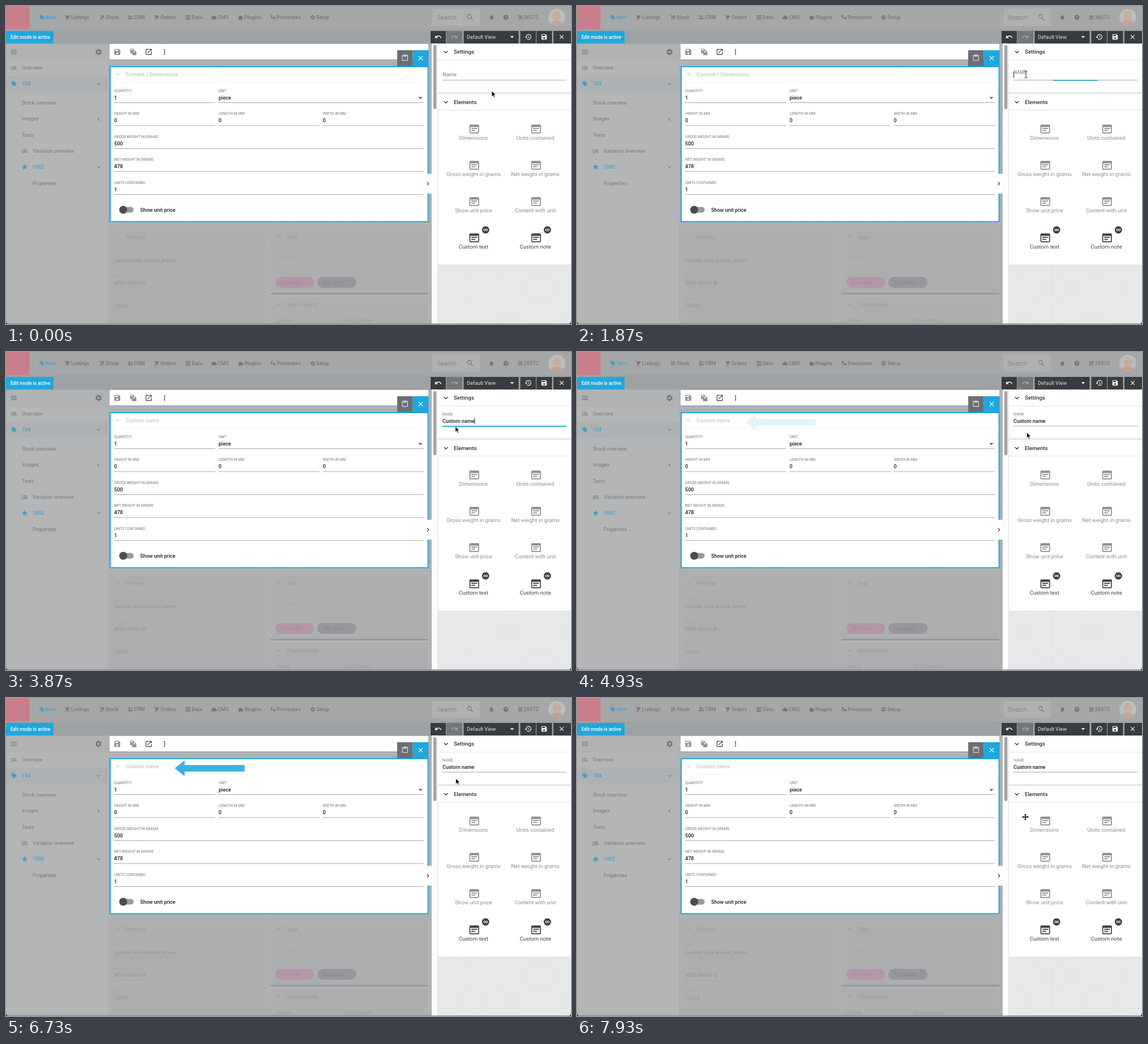
Recreate the animation shown at these times as an HTML page. Size 998x561 px, loop 8000 ms.

```html
<!DOCTYPE html>
<html lang="en">
<head>
<meta charset="utf-8">
<title>Edit mode</title>
<style>
html, body { margin: 0; width: 100%; height: 100%; overflow: hidden; background: #b4b6b8; }
svg { display: block; width: 998px; height: 561px; font-family: Roboto, "Liberation Sans", sans-serif; }
text { white-space: pre; }
</style>
</head>
<body>
<svg id="stage" viewBox="0 0 998 561"></svg>
<script>
const BLUE = '#20a7dc', DARK = '#383b40', DIM = '#75787b', DIMBLUE = '#439fc8', INK = '#1c1c1c';

// Icon paths on a 24 unit grid
const ICON = {
  save: 'M17 3H5a2 2 0 0 0-2 2v14a2 2 0 0 0 2 2h14a2 2 0 0 0 2-2V7zm-5 16a3 3 0 1 1 0-6 3 3 0 0 1 0 6zm3-10H5V5h10z',
  history: 'M13 3a9 9 0 0 0-9 9H1l4 4 4-4H6a7 7 0 1 1 2.06 4.94l-1.42 1.42A9 9 0 1 0 13 3zm-1 5v5l4.28 2.54.72-1.21-3.5-2.08V8z',
  undo: 'M12.5 8c-2.65 0-5.05 1-6.9 2.6L2 7v9h9l-3.62-3.62A8 8 0 0 1 20.1 16l2.37-.78A10.5 10.5 0 0 0 12.5 8z',
  close: 'M19 6.4 17.6 5 12 10.6 6.4 5 5 6.4l5.6 5.6L5 17.6 6.4 19l5.6-5.6 5.6 5.6 1.4-1.4-5.6-5.6z',
  down: 'M7.4 8.6 12 13.2l4.6-4.6L18 10l-6 6-6-6z',
  left: 'M15.4 7.4 10.8 12l4.6 4.6L14 18l-6-6 6-6z',
  right: 'M8.6 16.6 13.2 12 8.6 7.4 10 6l6 6-6 6z',
  drop: 'M7 10l5 5 5-5z',
  open: 'M19 19H5V5h7V3H5a2 2 0 0 0-2 2v14a2 2 0 0 0 2 2h14a2 2 0 0 0 2-2v-7h-2zM14 3v2h3.6l-9.8 9.8 1.4 1.4L19 6.4V10h2V3z',
  more: 'M12 8a2 2 0 1 0 0-4 2 2 0 0 0 0 4zm0 2a2 2 0 1 0 0 4 2 2 0 0 0 0-4zm0 6a2 2 0 1 0 0 4 2 2 0 0 0 0-4z',
  menu: 'M3 18h18v-2H3zm0-5h18v-2H3zm0-7v2h18V6z',
  search: 'M15.5 14h-.8l-.3-.3A6.5 6.5 0 1 0 13.7 14.4l.3.3v.8l5 5 1.5-1.5zm-6 0a4.5 4.5 0 1 1 0-9 4.5 4.5 0 0 1 0 9z',
  bell: 'M12 22a2 2 0 0 0 2-2h-4a2 2 0 0 0 2 2zm6-6v-5c0-3-1.6-5.6-4.5-6.3V4a1.5 1.5 0 0 0-3 0v.7C7.6 5.4 6 7.9 6 11v5l-2 2v1h16v-1z',
  star: 'M12 17.3 18.2 21l-1.6-7L22 9.2l-7.2-.6L12 2 9.2 8.6 2 9.2 7.4 14l-1.6 7z',
  tag: 'M21.4 11.6l-9-9A2 2 0 0 0 11 2H4a2 2 0 0 0-2 2v7c0 .55.22 1 .59 1.4l9 9a2 2 0 0 0 2.8 0l7-7a2 2 0 0 0 0-2.8zM5.5 7a1.5 1.5 0 1 1 0-3 1.5 1.5 0 0 1 0 3z',
  form: 'M20 3H4a2 2 0 0 0-2 2v14a2 2 0 0 0 2 2h16a2 2 0 0 0 2-2V5a2 2 0 0 0-2-2zm0 16H4V8h16zM6 10h12v2H6zm0 4h8v2H6z',
  clip: 'M19 3h-4.2a3 3 0 0 0-5.6 0H5a2 2 0 0 0-2 2v14a2 2 0 0 0 2 2h14a2 2 0 0 0 2-2V5a2 2 0 0 0-2-2zm-7 0a1 1 0 1 1 0 2 1 1 0 0 1 0-2zm7 16H5V5h2v3h10V5h2z',
  cart: 'M7 18a2 2 0 1 0 0 4 2 2 0 0 0 0-4zM1 2v2h2l3.6 7.6-1.4 2.4c-.7 1.3.3 3 1.8 3h12v-2H7.4l1.1-2h7.5c.7 0 1.4-.4 1.7-1l3.6-6.5A1 1 0 0 0 20.4 4H5.2l-.9-2zm10 16a2 2 0 1 0 0 4 2 2 0 0 0 0-4z',
  find: 'M7 9H2V7h5zm0 3H2v2h5zm13.6 7-3.8-3.8A5 5 0 1 1 18.2 13.8L22 17.6zM17 11a3 3 0 1 0-6 0 3 3 0 0 0 6 0zM2 19h10v-2H2z',
  copy: 'M3 2h9l3 3v3h3l4 4v10H9v-6H3zm2 2v3h6V4zm6 6v3h6v-3z',
  truck: 'M2 2h4l4 14h11v2H10a3 3 0 1 1-3-2L4.500 4H2zm8 3 8-2 3 9-8 2z',
  people: 'M8 11a4 4 0 1 0 0-8 4 4 0 0 0 0 8zm9 0a3 3 0 1 0 0-6 3 3 0 0 0 0 6zM1 20c0-9 14-9 14 0zm15 0h7c0-5-3-7-8-6z',
  bars: 'M2 3h20v4H2zm0 7h20v4H2zm0 7h20v4H2z',
  cloud: 'M6 20a5.500 5.500 0 0 1-.5-11A7 7 0 0 1 19 10a5 5 0 0 1 0 10z',
  puzzle: 'M3 7h5a3 3 0 1 1 6 0h5v5a3 3 0 1 1 0 5v5h-6a3 3 0 0 0-5 0H3v-5a3 3 0 0 0 0-5z',
  flow: 'M2 3h8v6H7v5h7v-3h8v9h-8v-3H4V9H2z',
  gear: 'M10 2h4l.6 3 2 1.100 2.800-1 2 3.500-2.200 2v2.800l2.200 2-2 3.500-2.800-1-2 1.100-.6 3h-4l-.6-3-2-1.100-2.800 1-2-3.500 2.200-2v-2.800l-2.200-2 2-3.500 2.800 1 2-1.100zM12 8.500a3.500 3.500 0 1 0 0 7 3.500 3.500 0 0 0 0-7z'
};

let out = '';
const rect = (x, y, w, h, fill, more = '') =>
  out += `<rect x="${x}" y="${y}" width="${w}" height="${h}" fill="${fill}" ${more}/>`;
const line = (x1, x2, y, stroke, w = 1, more = '') =>
  out += `<path d="M${x1} ${y}H${x2}" stroke="${stroke}" stroke-width="${w}" ${more}/>`;
const circle = (x, y, r, fill, more = '') =>
  out += `<circle cx="${x}" cy="${y}" r="${r}" fill="${fill}" ${more}/>`;
const text = (x, y, str, size, fill, weight = 400, more = '') =>
  out += `<text x="${x}" y="${y}" font-size="${size}" fill="${fill}" font-weight="${weight}" ${more}>${str}</text>`;
const icon = (name, x, y, size, fill, flip = 1) => {
  const s = size / 24;
  out += `<path transform="translate(${x} ${y}) scale(${s * flip} ${s}) translate(-12 -12)" fill="${fill}" fill-rule="evenodd" d="${ICON[name]}"/>`;
};

function header() {
  rect(0, 0, 998, 41, '#a5a7a9');
  rect(0, 41, 998, 25.500, '#9fa2a4');
  rect(0, 0, 41.500, 41, '#c97f89');
  const nav = [['Item', 70, 'tag'], ['Listings', 115, 'cart'], ['Stock', 176, 'truck'], ['CRM', 226, 'people'],
    ['Orders', 273, 'cart'], ['Data', 328, 'bars'], ['CMS', 374, 'cloud'], ['Plugins', 421, 'puzzle'],
    ['Processes', 478, 'flow'], ['Setup', 548, 'gear']];
  nav.forEach(([label, x, name], i) => {
    const fill = i ? DIM : DIMBLUE;
    icon(name, x - 6.500, 20, 10, fill);
    text(x, 23.200, label, 9.100, fill, 500);
  });
  rect(753, 5, 84, 30, '#aeb0b2', 'rx="1"');
  text(761, 24, 'Search', 11.400, '#85888b');
  icon('search', 820, 20, 15, DIM);
  icon('bell', 857.500, 20, 11, DIM);
  circle(883, 20, 4.500, DIM);
  text(883, 22.800, '?', 7.500, '#a5a7a9', 700, 'text-anchor="middle"');
  icon('bars', 908.500, 20, 9, DIM);
  text(914.500, 23.200, '26572', 9.300, DIM, 500);
  circle(973, 20, 15, '#bcbdbd');
  out += '<path d="M963 31c0-7 20-7 20 0a15 15 0 0 1-20 0z" fill="#c3a493"/>';
  out += '<ellipse cx="973" cy="17.500" rx="7" ry="8.500" fill="#c9ad98"/>';
  rect(0, 44, 84, 22, BLUE);
  text(8, 58, 'Edit mode is active', 8.300, '#fff', 500);
}

function sidebar() {
  rect(0, 66, 180, 495, '#b3b5b7');
  rect(0, 66, 180, 29, '#b0b2b4');
  line(0, 180, 95, '#a9abad', .7);
  icon('menu', 14, 81, 14, DIM);
  icon('gear', 163.500, 81, 14, DIM);
  icon('find', 14, 109, 13, DIM);
  text(28, 112, 'Overview', 9, DIM);
  rect(0, 123, 180, 28, '#aeb1b3');
  icon('tag', 14, 137, 11, DIMBLUE);
  text(28, 140, '104', 9, DIMBLUE, 500);
  icon('down', 163.500, 137, 13, DIM);
  text(28, 174, 'Stock overview', 9, DIM);
  text(28, 202.300, 'Images', 9, DIM);
  icon('left', 163.500, 199.500, 13, DIM);
  text(28, 230.500, 'Texts', 9, DIM);
  icon('find', 33, 256, 13, DIM);
  text(47, 259, 'Variation overview', 9, DIM);
  icon('star', 33, 284, 13, DIMBLUE);
  text(47, 287, '1002', 9, DIMBLUE, 500);
  icon('down', 163.500, 284, 13, DIM);
  text(47, 315.500, 'Properties', 9, DIM);
}

function backdrop() {
  const dash = 'stroke-dasharray="1.500 1.500"', edge = '#a0a2a4', faint = '#a3a5a7';
  rect(180, 66, 572, 495, '#b0b2b4');
  rect(183, 67, 563, 27.500, '#fff');
  rect(183, 94.500, 563, 1.500, '#9d9fa1');
  icon('save', 196.500, 81, 14, '#8f9194');
  icon('copy', 224.500, 81, 14, '#8f9194');
  icon('open', 252, 81, 14, DARK);
  icon('more', 280, 81, 14, DARK);
  [103, 386.500, 391].forEach(y => line(181, 748, y, edge, 1, dash));
  out += `<path d="M181 103V561M748.500 103V561M464.500 391V561" stroke="${edge}" stroke-width="1" ${dash}/>`;
  rect(183, 393.500, 279, 168, '#acaeb0');
  rect(467, 393.500, 279, 115, '#acaeb0');
  rect(467, 506.500, 279, 2, '#908f95');
  rect(467, 513, 279, 48, '#acaeb0');
  [[197, 407], [481.500, 407], [481.500, 526.500]].forEach(([x, y]) => icon('down', x, y, 13, '#9b9da0'));
  text(211, 410.500, 'Settings', 9.550, '#9c9ea0', 500);
  text(495, 410.500, 'Tags', 9.550, '#9c9ea0', 500);
  text(495, 530, 'Client (store)', 9.550, '#9c9ea0', 500);
  line(183, 462, 422, '#a5a7a9', .6);
  text(191, 451.500, 'Leather sofa walnut, brown', 9, '#989a9c', 500);
  text(191, 492, 'WSG-00431-B', 9, '#989a9c', 500);
  text(191, 532, '12345', 9, '#989a9c', 500);
  [['NAME', 438], ['NUMBER', 479], ['MODEL', 519]].forEach(([s, y]) => text(191, y, s, 6.500, '#a6a8aa'));
  [457, 498, 538].forEach(y => line(191, 455, y, faint, .6));
  text(477, 446, 'Add tags', 9, '#a5a7a9');
  rect(476, 478, 68, 19, '#b496a8', 'rx="9.500"');
  rect(550, 478, 69, 19, '#95979a', 'rx="9.500"');
  text(485, 491, 'Bestseller', 8.500, '#a88a9c');
  text(559, 491, 'Top Seller', 8.500, '#85878a');
  text(477, 558, 'Active', 9, '#9c9ea0');
  text(595, 558, 'Client (store)', 9, '#9c9ea0');
}

function field(x, x2, y, label, value) {
  text(x, y + 2.300, label, 6.500, '#747474');
  text(x, y + 15, value, 9.050, INK, 500);
  line(x, x2, y + 21, '#9d9d9d', .9);
}

function dialog() {
  rect(691, 78, 27.500, 28, '#6b6e74');
  rect(718.500, 78, 28, 28, BLUE);
  icon('clip', 704.700, 91.500, 14, '#d9dadc');
  icon('close', 732.500, 92, 14, '#fff');
  rect(184, 107, 561.500, 273.500, '#fff', `stroke="${BLUE}" stroke-width="2"`);
  icon('down', 197, 120.500, 13, '#c4c4c4');
  text(211, 123.800, '', 9.550, '#c6c6c6', 500, 'id="title"');
  line(185, 744.500, 134.500, '#f1f1f1', .8);
  field(191, 369.500, 149.500, 'QUANTITY', '1');
  field(375.500, 738, 149.500, 'UNIT', 'piece');
  icon('drop', 732, 162, 17, '#5f5f5f');
  field(191, 369.500, 190, 'HEIGHT IN MM', '0');
  field(375.500, 553.500, 190, 'LENGTH IN MM', '0');
  field(559.500, 738, 190, 'WIDTH IN MM', '0');
  field(191, 738, 230.500, 'GROSS WEIGHT IN GRAMS', '500');
  field(191, 738, 271, 'NET WEIGHT IN GRAMS', '478');
  field(191, 738, 311.500, 'UNITS CONTAINED', '1');
  rect(203, 354.500, 22.500, 10, '#9b9b9d', 'rx="5"');
  circle(207, 359.500, 7, '#4a4c52');
  text(237, 362.600, 'Show unit price', 9, INK, 500);
  out += `<path id="pointer" opacity="0" fill="${BLUE}" d="M298 124 315.500 110V118.300H421.500V129.800H315.500V138z"/>`;
}

function panel() {
  rect(752, 66, 11, 495, '#fcfcfc');
  rect(762.300, 66, .7, 495, '#d5d5d5');
  rect(754.800, 69, 5.500, 113, '#a3a3a5', 'rx="2.700"');
  rect(739, 296, 13, 35, '#fff');
  icon('right', 745.300, 313.500, 13, INK);

  rect(750, 44, 248, 22, DARK);
  rect(778, 44, 27.500, 22, '#74777a');
  [777, 805.500, 905.500, 936, 964.500].forEach((x, i) => rect(x, 44, [1, 3, 3, 1, 2.500][i], 22, '#9fa2a4'));
  icon('undo', 763.500, 54.500, 13, '#fff');
  icon('undo', 792, 54.500, 13, '#a6a8ab', -1);
  text(814, 57.800, 'Default View', 9.100, '#e2e3e4');
  icon('drop', 894, 54.500, 16, '#fff');
  icon('history', 922.500, 54.500, 13, '#fff');
  icon('save', 950.500, 54.500, 12.500, '#fff');
  icon('close', 981.500, 54.500, 12.500, '#fff');

  rect(763, 66.500, 235, 390, '#fff');
  line(763, 998, 95.500, '#dcdcdc', .8);
  rect(763, 152.300, 235, 2.500, '#e2e2e2');
  line(763, 998, 183.500, '#dcdcdc', .8);
  [['Settings', 81], ['Elements', 169.500]].forEach(([s, y]) => {
    icon('down', 777, y, 15, INK);
    text(791, y + 3.300, s, 9.700, '#2f2f2f', 500);
  });

  const cells = ['Dimensions', 'Units contained', 'Gross weight in grams', 'Net weight in grams',
    'Show unit price', 'Content with unit', 'Custom text', 'Custom note'];
  cells.forEach((label, i) => {
    const x = i % 2 ? 935 : 825.800, y = 217 + 64 * (i >> 1), free = i > 5;
    const fill = free ? '#3d4046' : '#8b8d90';
    icon('form', x + 1.300, y, 20.500, fill);
    text(x, y + 19.400, label, 9.650, fill, 400, 'text-anchor="middle"');
    if (!free) return;
    circle(x + 21.300, 395, 6.500, '#3d4046');
    [-1.900, 1.900].forEach(d => circle(x + 21.300 + d, 395, 1.600, 'none', 'stroke="#fff" stroke-width="1"'));
  });

  rect(763, 456, 235, 105, '#e6e8ea');
  for (let x = 778; x < 998; x += 15) rect(x, 456, .7, 105, '#dfe2e4');
  for (let y = 471; y < 561; y += 15) rect(763, y, 235, .7, '#dfe2e4');

  line(771, 990, 130.800, '#9d9d9d', .9);
  out += '<path id="ripple" d="M771 131.200H990" stroke="#13a6bd" stroke-width="1.600"/>';
  text(771, 124, 'Name', 9.400, '#7a7a7a', 400, 'id="label"');
  text(771, 125, '', 9.050, INK, 500, 'id="value"');
  rect(771, 116, .9, 11, '#111', 'id="caret"');
}

function cursors() {
  out += `<g id="cursor">
    <path d="M0 0v9.800l2.300-2.100 1.600 3.600 1.700-.8-1.600-3.500h3.100z" fill="#000" stroke="#fff" stroke-width=".7"/>
    <path d="M-2.500-6q2 0 2.500 1.200Q.5-6 2.500-6M0-5V5M-2.500 6Q-.5 6 0 4.800.5 6 2.500 6" fill="none" stroke="#222" stroke-width="1"/>
    <path d="M0-6 2.400-3.300H.9V-.9H3.300V-2.400L6 0 3.300 2.400V.9H.9V3.300H2.400L0 6-2.400 3.300H-.9V.9H-3.300V2.400L-6 0-3.300-2.400V-.9H-.9V-3.300H-2.400z" fill="#000" stroke="#fff" stroke-width=".4"/>
  </g>`;
}

sidebar();
backdrop();
header();
dialog();
panel();
out += '<path d="M0 555q0 6 6 6H0zM998 555q0 6-6 6h6z" fill="#333"/>';
line(4, 994, 560.600, '#6c6e70', .8);
cursors();
document.getElementById('stage').innerHTML = out;

const $ = id => document.getElementById(id);
const [title, pointer, ripple, label, value, caret, cursor] =
  ['title', 'pointer', 'ripple', 'label', 'value', 'caret', 'cursor'].map($);
const NAME = 'Custom name';
const LOOP = 8000, TICK = 1000 / 15;

// Cursor path: tick, x, y
const PATH = [[0, 858, 150], [10, 858, 150], [14, 838, 145], [18, 813, 134], [21, 798, 125], [23, 793, 121],
  [56, 793, 121], [60, 794.500, 142], [115, 794.500, 142], [116, 794, 147], [117, 793, 165], [118, 792, 189],
  [119, 792, 210], [120, 792, 210]];

const clamp = v => Math.min(1, Math.max(0, v));
const mix = (a, b, p) => a + (b - a) * p;
const ramp = (k, from, steps) => clamp((k - from + 1) / steps);

function place(k) {
  const i = PATH.findIndex(p => p[0] > k);
  const [a, b] = [PATH[i - 1], PATH[i]];
  const p = (k - a[0]) / (b[0] - a[0]);
  return [mix(a[1], b[1], p), mix(a[2], b[2], p)];
}

function draw(t) {
  const k = Math.floor((t + 4) / TICK) % 120;
  const typed = NAME.slice(0, k < 41 ? 0 : Math.max(1, k - 41));
  const focus = ramp(k, 28, 5), ease = focus * (2 - focus);

  title.textContent = typed || 'Content / Dimensions';
  value.textContent = typed;
  label.textContent = focus ? 'NAME' : 'Name';
  label.setAttribute('font-size', mix(9.4, 6.55, ease));
  label.setAttribute('y', mix(124, 112.4, ease));

  const half = 109.5 * ease;
  ripple.setAttribute('d', `M${880.5 - half} 131.2H${880.5 + half}`);
  ripple.setAttribute('opacity', focus ? 1 - ramp(k, 61, 5) : 0);
  caret.setAttribute('x', 771 + (typed ? value.getComputedTextLength() : 0));
  caret.setAttribute('opacity', (k >= 28 && k < 34) || (k >= 41 && k < 60) ? 1 : 0);
  pointer.setAttribute('opacity', ramp(k, 74, 8) - ramp(k, 101, 8));

  const [x, y] = place(k);
  const shape = y > 186 ? 2 : y < 131 ? 1 : 0;
  cursor.setAttribute('transform', `translate(${x} ${y})`);
  cursor.setAttribute('opacity', k >= 41 && k < 57 ? 0 : 1);
  [...cursor.children].forEach((c, i) => c.setAttribute('visibility', i === shape ? 'visible' : 'hidden'));
}

const start = performance.now();
function loop() {
  draw((performance.now() - start) % LOOP);
  requestAnimationFrame(loop);
}
loop();
</script>
</body>
</html>
```
